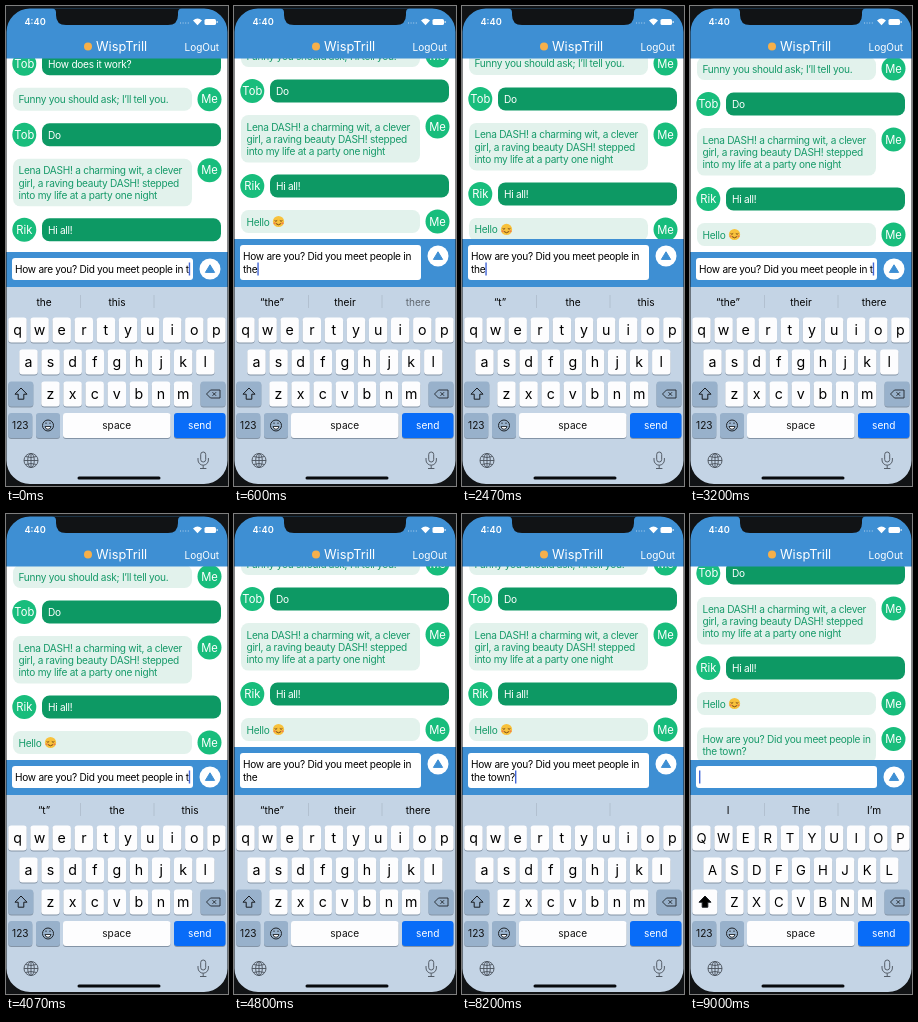
Write an HTML page that moves like this. It is 222 px wide and 480 px high and loops after 9.07 s.

```html
<!DOCTYPE html>
<html lang="en">
<head>
<meta charset="utf-8">
<title>Chat</title>
<style>
html, body { margin: 0; width: 100%; height: 100%; overflow: hidden; background: #111; }
svg { display: block; width: 222px; height: 480px; }
text { font-family: Inter, "Noto Sans", sans-serif; font-size: 10.1px; letter-spacing: -.027em; white-space: pre; }
.mid { text-anchor: middle; letter-spacing: 0; }
.key { font-size: 14.2px; }
.caps .key { font-size: 13.2px; }
</style>
</head>
<body>
<svg id="stage" viewBox="0 0 222 480">
  <defs>
    <clipPath id="listClip"><rect id="listBox" y="52" width="222" height="194"/></clipPath>
  </defs>
  <rect width="222" height="480" fill="#fff"/>
  <g clip-path="url(#listClip)"><g id="list"></g></g>
  <g id="header" fill="#fff">
    <rect width="222" height="52.5" fill="#3e8fd3"/>
    <circle cx="82" cy="40.5" r="4" fill="#f6b04a"/>
    <text x="90" y="45" style="font-size:12.8px;letter-spacing:0">WispTrill</text>
    <text x="178.5" y="45" style="font-size:10px;letter-spacing:0">LogOut</text>
  </g>
  <g id="bar">
    <rect id="barBox" width="222" fill="#3e8fd3"/>
    <rect id="field" x="6" width="181" rx="3" fill="#fff"/>
    <text id="line1" x="9"></text>
    <text id="line2" x="9" y="266.5"></text>
    <rect id="caret" width="1.4" height="13" fill="#4267d8"/>
    <g id="sendUp"><circle r="10.5" fill="#fff"/><path d="M-4.6 3.4L0-4.2 4.6 3.4Z" fill="#3e8fd3" stroke="#3e8fd3" stroke-linejoin="round"/></g>
  </g>
  <rect y="281" width="222" height="199" fill="#c4d4e5"/>
  <path d="M74.5 289v13M148 289v13" stroke="#aebccb" stroke-width=".8"/>
  <g id="words"></g>
  <g id="keys"></g>
  <g fill="none" stroke="#4a525c" stroke-width=".9">
    <circle cx="25" cy="454.5" r="7"/>
    <ellipse cx="25" cy="454.5" rx="3.3" ry="7"/>
    <path d="M18 454.5h14M25 447.5v14M19.5 450.5q5.5 2 11 0M19.5 458.5q5.5-2 11 0"/>
    <rect x="194.7" y="446" width="5" height="10" rx="2.5"/>
    <path d="M192 452v2a5.2 5.2 0 0 0 10.4 0v-2M197.2 459.3v3M194 462.5h6.4"/>
  </g>
  <rect x="71.5" y="470.5" width="83" height="3" rx="1.5" fill="#080a0d"/>
  <path fill="#111315" fill-rule="evenodd" d="M0 0H222V480H0ZM24 2.5H198a23.5 23.5 0 0 1 23.5 23.5V454.5a23.5 23.5 0 0 1-23.5 23.5H24a23.5 23.5 0 0 1-23.5-23.5V26a23.5 23.5 0 0 1 23.5-23.5Z"/>
  <path fill="#111315" d="M46 2.5q4 0 4 4v2.5q0 10 10 10h102q10 0 10-10v-2.5q0-4 4-4Z"/>
  <g fill="#fff">
    <text x="18.5" y="19" style="font-size:9.2px;font-weight:600;letter-spacing:0">4:40</text>
    <path d="M174 17h9" stroke="#fff" stroke-width="1" stroke-dasharray="1 1.6" opacity=".6"/>
    <path d="M187 14.5q4.5-4 9 0l-4.5 4.8Z"/>
    <rect x="198.5" y="13" width="11.5" height="6" rx="1.6"/>
    <rect x="210.6" y="15" width="1" height="2" rx=".5"/>
  </g>
</svg>
<script>
const LOOP = 9070, NS = "http://www.w3.org/2000/svg";
const byId = id => document.getElementById(id);
const clamp = v => Math.max(0, Math.min(1, v));
const ease = p => (1 - Math.cos(Math.PI * clamp(p))) / 2;
const latest = (list, t) => list.filter(e => e[0] <= t).pop();

function add(parent, tag, attrs, text) {
  const el = document.createElementNS(NS, tag);
  for (const k in attrs) el.setAttribute(k, attrs[k]);
  if (text !== undefined) el.textContent = text;
  return parent.appendChild(el);
}
function set(id, attrs) {
  const el = byId(id);
  for (const k in attrs) el.setAttribute(k, attrs[k]);
}

// Conversation; y = 0 is the avatar centre of the "Hello" row.
const ROW = 35.5, LINE = 12.3;
const chat = [
  ["Tob", "How does it work?"],
  ["Me", "Funny you should ask; I’ll tell you."],
  ["Tob", "Do"],
  ["Me", "Lena DASH! a charming wit, a clever", "girl, a raving beauty DASH! stepped", "into my life at a party one night"],
  ["Rik", "Hi all!"],
  ["Me", "Hello"],
  ["Me", "How are you? Did you meet people in", "the town?"]
];
function addRow([who, ...lines], y) {
  const me = who === "Me", g = add(byId("list"), "g", { transform: `translate(0 ${y})` });
  add(g, "rect", { x: me ? 7 : 36, y: -11.5, width: 179, height: 23 + (lines.length - 1) * LINE, rx: 7.5, fill: me ? "#e2f2ec" : "#0d9964" });
  add(g, "circle", { cx: me ? 203.5 : 18.3, r: 12, fill: "#18bd7c" });
  add(g, "text", { x: me ? 203.5 : 18.3, y: 4.2, class: "mid", fill: "#fff", style: "font-size:11.2px" }, who);
  lines.forEach((s, i) => add(g, "text", { x: me ? 12.5 : 42, y: 4 + i * LINE, fill: me ? "#169a69" : "#fff" }, s));
  if (lines[0] === "Hello") {
    add(g, "circle", { cx: 44.5, r: 5.6, fill: "#f8c23c" });
    add(g, "path", { d: "M40.6-1q1.3 1.5 2.6 0M45.8-1q1.3 1.5 2.6 0M41.8 2q2.7 2.6 5.4 0", fill: "none", stroke: "#6b3d13", "stroke-width": .9 });
    add(g, "path", { d: "M40.5 1.8h.1M48.5 1.8h.1", stroke: "#ef7f4d", "stroke-width": 2, "stroke-linecap": "round" });
  }
  return g;
}
let rowY = -5 * ROW - 2 * LINE + .6, sent;
for (const row of chat) {
  sent = addRow(row, rowY);
  rowY += ROW + (row.length - 2) * (LINE - .3);
}

// Keyboard
const letters = [], keys = byId("keys"), WHITE = "#fdfdfe", GREY = "#98b1cb";
function addKey(x, y, w, fill) {
  add(keys, "rect", { x, y: y - 11.5, width: w, height: 25, rx: 3, fill: "#8494a6" });
  return add(keys, "rect", { x, y: y - 12.5, width: w, height: 25, rx: 3, fill });
}
[["qwertyuiop", 11.5, 324], ["asdfghjkl", 22.5, 356], ["zxcvbnm", 44.5, 388]].forEach(([row, x0, y]) =>
  [...row].forEach((c, i) => {
    const x = x0 + i * 22.1;
    addKey(x - 9.2, y, 18.4, WHITE);
    letters.push([c, add(keys, "text", { x, y: y + 5, class: "mid key" }, c)]);
  }));
const shift = addKey(2.3, 388, 25, GREY);
const arrow = add(keys, "path", { d: "M15 382l6 6.2h-3.2v5h-5.6v-5H9Z", stroke: "#16191d", "stroke-linejoin": "round" });
addKey(194.5, 388, 25, GREY);
add(keys, "path", { d: "M200.5 388l4-4h9.500v8h-9.500ZM206.500 386.200l3.600 3.600M210.100 386.200l-3.600 3.600", fill: "none", stroke: "#20252b", "stroke-width": .9, "stroke-linejoin": "round" });
[[2.3, 24, GREY, "123"], [30, 24, GREY, ""], [57, 107.5, WHITE, "space"], [168, 51.5, "#086cf8", "send"]].forEach(([x, w, fill, label]) => {
  addKey(x, 419.5, w, fill);
  add(keys, "text", { x: x + w / 2, y: 423, class: "mid", fill: label === "send" ? "#fff" : "#111" }, label);
});
add(keys, "circle", { cx: 42, cy: 419.5, r: 5.5, fill: "none", stroke: "#20252b" });
add(keys, "path", { d: "M39 420.5h6q-.5 2.800-3 2.800t-3-2.800ZM40 416.5v1.500M44 416.5v1.500", fill: WHITE, stroke: "#20252b", "stroke-width": .9 });

const words = [38, 111, 184].map(x => add(byId("words"), "text", { x, y: 299.5, class: "mid" }));

// Drafting: [time, end of the draft]; suggestions follow a little later.
const LAG = 140, SCROLL = 300, SEND = 8350, ARRIVE = 8780;
const grows = [300, 2370, 4250], shrinks = [1350, 3130];
const forThe = ["“the”", "their", "there"], forT = ["“t”", "the", "this"];
const edits = [[0, "t"]], hints = [[-500, "the", "this", ""]];
grows.forEach((g, i) => {
  edits.push([g, "th"], [g + 60, "the"]);
  hints.push([g + LAG, ...forThe]);
  const s = shrinks[i];
  if (s) {
    edits.push([s - 60, "th"], [s, "t"]);
    hints.push([s + LAG, ...forT]);
  }
});
edits.push([6350, "the "], [7000, "the t"], [7250, "the to"], [7450, "the tow"], [7650, "the town"], [8000, "the town?"], [SEND, ""]);
hints.push([6450, "office", "morning", "house"], [7000 + LAG, ...forT], [7250 + LAG, "“to”", "to", "the"], [7650 + LAG, "“town”", "towns", "township"], [8000 + LAG, "", "", ""], [SEND + LAG, "I", "The", "I’m"]);

function caretAlpha(t) {
  if (t < 4600) return 1;
  if (t < 5000) return 1 - clamp((t - 4600) / 180);
  if (t < 5530) return clamp((t - 5000) / 130);
  if (t < 6040) return 1 - clamp((t - 5530) / 200);
  return clamp((t - 6040) / 90);
}

function listShift(t) {
  if (t >= ARRIVE) return -46.5 * ease((t - ARRIVE) / SCROLL);
  if (t < grows[0]) return 36 * (1 - ease((t + 74) / SCROLL));
  const grown = grows.filter(v => v <= t).pop();
  return 13 * (1 - ease((t - grown) / 235));
}

function draw(t) {
  const tail = latest(edits, t)[1], done = t >= SEND;
  const two = tail.length > 1, top = two ? 233 : 246;
  const start = "How are you? Did you meet people in";

  set("listBox", { height: top - 52 });
  set("list", { transform: `translate(0 ${top - 17.5 + listShift(t)})` });
  sent.setAttribute("visibility", t >= ARRIVE ? "visible" : "hidden");
  set("barBox", { y: top, height: 281 - top });
  set("field", { y: top + 6, height: 268 - top });
  set("sendUp", { transform: `translate(204 ${top + 17})` });

  const line1 = byId("line1"), line2 = byId("line2");
  line1.setAttribute("y", top + 20.5);
  line1.textContent = done ? "" : two ? start : start + " " + tail;
  line2.textContent = two ? tail : "";
  const active = two ? line2 : line1;
  const end = active.textContent ? active.getComputedTextLength() : 0;
  set("caret", { x: 9 + end, y: 256.5, opacity: caretAlpha(t) });

  const [since, ...hint] = latest(hints, t);
  words.forEach((el, i) => {
    el.textContent = hint[i];
    el.setAttribute("opacity", clamp((t - since - i * 60) / 80));
  });

  keys.setAttribute("class", done ? "caps" : "");
  letters.forEach(([c, el]) => { el.textContent = done ? c.toUpperCase() : c; });
  shift.setAttribute("fill", done ? WHITE : GREY);
  arrow.setAttribute("fill", done ? "#000" : "none");
}

const begin = performance.now();
function tick() {
  draw((performance.now() - begin) % LOOP);
  requestAnimationFrame(tick);
}
draw(0);
requestAnimationFrame(tick);
</script>
</body>
</html>
```
